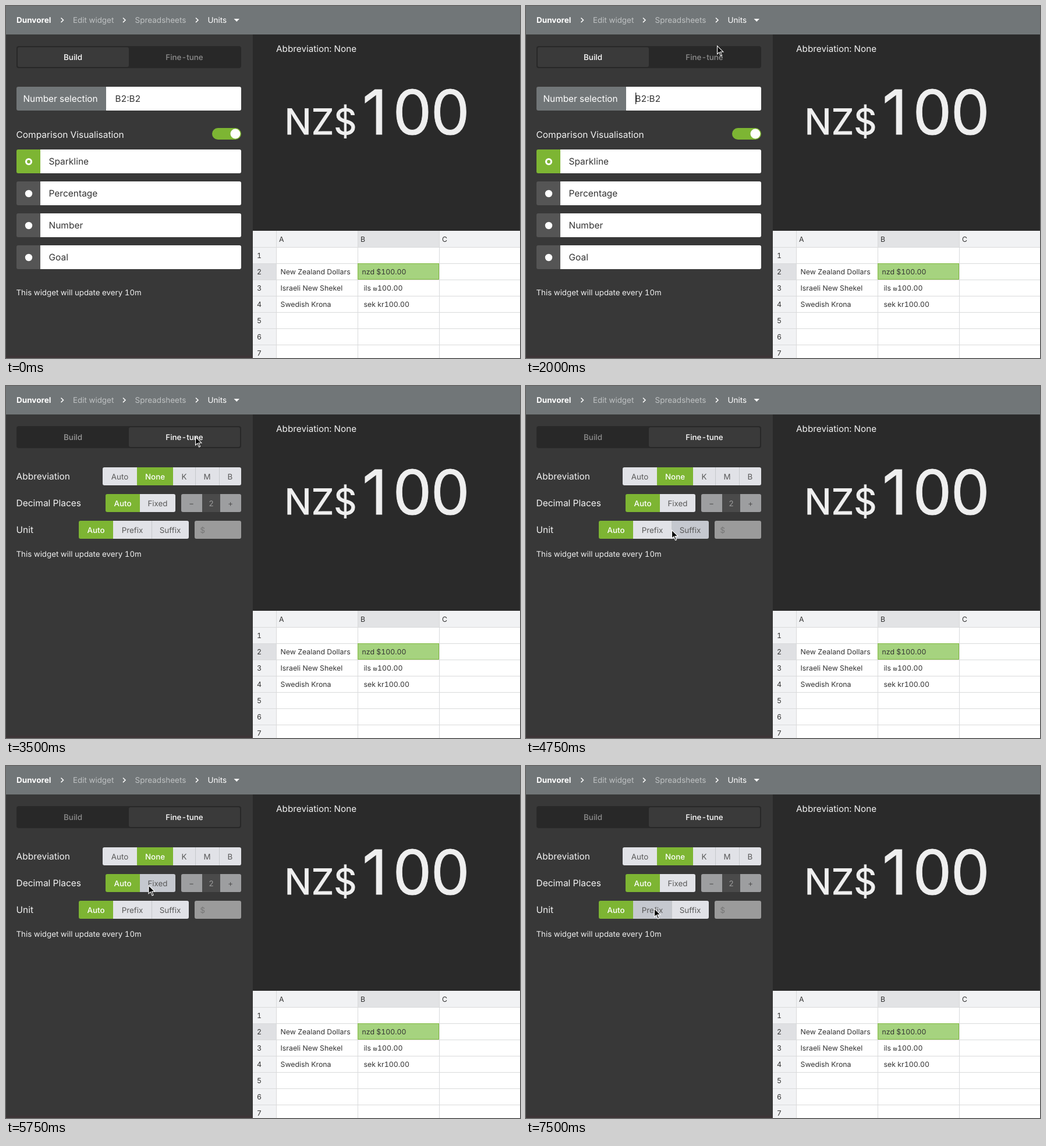
These frames come from a looping animation (883 px wide and 606 px high, 8000 ms). An HTML page:

```html
<!DOCTYPE html>
<html lang="en">
<head>
<meta charset="utf-8">
<title>Widget units</title>
<style>
html, body { margin: 0; width: 100%; height: 100%; overflow: hidden; background: #383838; }
svg { display: block; width: 883px; height: 606px; font-family: Inter, Roboto, "Liberation Sans", sans-serif; font-variant-numeric: tabular-nums; }
text { white-space: pre; }
.amount { font-variant-numeric: normal; stroke: #efefef; stroke-width: 0.9px; }
</style>
</head>
<body>
<svg id="stage" viewBox="0 0 883 606" text-rendering="geometricPrecision"></svg>
<script>
const LOOP = 8000;
const GREEN = '#7db533', GREY = '#717678', LIGHT = '#e1e2e7', HOVER = '#c5c8cf', INK = '#333', DIM = '#8d8d8d';

const rect = (x, y, w, h, fill, extra = '') =>
  `<rect x="${x}" y="${y}" width="${w}" height="${h}" fill="${fill}" ${extra}/>`;
const text = (x, y, str, size, fill, extra = '') =>
  `<text x="${x}" y="${y}" font-size="${size}" fill="${fill}" ${extra}>${str}</text>`;
const path = (d, extra) => `<path d="${d}" ${extra}/>`;
const group = (id, content) => `<g id="${id}">${content}</g>`;
const MID = 'text-anchor="middle"';
const MEDIUM = 'font-weight="500"';

// A rectangle with only its left or right corners rounded
function sided(x, y, w, h, left, right, fill, id = '') {
  const r = 3, a = left ? r : 0, b = right ? r : 0;
  return path(`M${x + a} ${y}H${x + w - b}q${b} 0 ${b} ${b}V${y + h - b}q0 ${b} ${-b} ${b}` +
    `H${x + a}q${-a} 0 ${-a} ${-a}V${y + a}q0 ${-a} ${a} ${-a}z`, `fill="${fill}" ${id && `id="${id}"`}`);
}

function header() {
  const chevron = x => path(`M${x} 20.5l4 3.8l-4 3.8`, 'fill="none" stroke="#fff" stroke-width="1.5"');
  return rect(0, 0, 883, 49, GREY) +
    text(18, 29, 'Dunvorel', 13.5, '#fff', 'font-weight="700"') +
    text(115, 29, 'Edit widget', 13.4, '#bfc2c3') +
    text(221.5, 29, 'Spreadsheets', 13.5, '#bfc2c3') +
    text(346.5, 29, 'Units', 13.5, '#fff') +
    [94.5, 201, 326].map(chevron).join('') +
    path('M391.5 22h9.5l-4.75 5z', 'fill="#fff"');
}

function tabs() {
  return rect(18, 69, 386, 38, '#282828', 'rx="4"') +
    rect(20, 71, 191, 34, '#3a3a3a', 'rx="3" id="activeTab"') +
    text(115, 93, 'Build', 13.5, '#fff', `${MID} ${MEDIUM} id="buildLabel"`) +
    text(306.5, 93, 'Fine-tune', 13.4, DIM, `${MID} ${MEDIUM} id="tuneLabel"`);
}

const updateNote = y => text(17.5, y, 'This widget will update every 10m', 13.3, '#f0f0f0');

function buildPanel() {
  const options = ['Sparkline', 'Percentage', 'Number', 'Goal'].map((name, i) => {
    const y = 247 + i * 55, on = i === 0;
    const dot = on ? 'r="4.5" fill="none" stroke="#fff" stroke-width="3.2"' : 'r="6.2" fill="#fff"';
    return sided(18, y, 41, 41, 1, 0, on ? GREEN : '#555') + sided(59, y, 345, 41, 0, 1, '#fff') +
      `<circle cx="39" cy="${y + 21}" ${dot}/>` + text(73.5, y + 26, name, 15.5, INK);
  }).join('');
  return sided(18, 139, 154, 41, 1, 0, GREY) + sided(172, 139, 232, 41, 0, 1, '#fff') +
    text(29.5, 165, 'Number selection', 15.4, '#fff') +
    text(187.5, 165, 'B2:B2', 15.3, INK) +
    rect(188, 149, 1.3, 20, '#222', 'id="caret"') +
    text(17.5, 227, 'Comparison Visualisation', 15.5, '#f4f4f4') +
    rect(354, 210, 50, 20, GREEN, 'rx="10"') + '<circle cx="394" cy="220" r="8.5" fill="#fff"/>' +
    options + updateNote(498);
}

function segments(y, edges, names, selected, ids = []) {
  const last = names.length - 1;
  return names.map((name, i) => {
    const x = edges[i], w = edges[i + 1] - x, on = i === selected;
    return sided(x, y, w, 31, i === 0, i === last, on ? GREEN : LIGHT, ids[i]) +
      (i > selected + 1 ? rect(x, y, 1, 31, '#c6c8cc') : '') +
      text(x + w / 2, y + 21, name, 13.4, on ? '#fff' : '#585858', `${MID} ${on ? MEDIUM : ''}`);
  }).join('');
}

function tunePanel() {
  const labels = ['Abbreviation', 'Decimal Places', 'Unit']
    .map((name, i) => text(17.5, 161 + i * 46, name, 15.5, '#f4f4f4')).join('');
  return labels +
    segments(140, [166, 225, 287, 325, 366, 404], ['Auto', 'None', 'K', 'M', 'B'], 1) +
    segments(186, [171, 230, 291], ['Auto', 'Fixed'], 0, ['', 'fixedButton']) +
    sided(301, 186, 36, 31, 1, 0, '#9d9ea0') + rect(337, 186, 31, 31, '#4a4a4a') +
    sided(368, 186, 36, 31, 0, 1, '#9d9ea0') +
    text(318.5, 207, '−', 13.4, '#505050', MID) + text(352.5, 207, '2', 13.4, '#9a9a9a', MID) +
    text(385.5, 207, '+', 13.4, '#505050', MID) +
    segments(232, [125, 184, 250, 314], ['Auto', 'Prefix', 'Suffix'], 0, ['', 'prefixButton', 'suffixButton']) +
    rect(324, 232, 80, 31, '#9b9b9b', 'rx="3"') + text(333.5, 253, '$', 13.4, '#777') +
    updateNote(294);
}

function preview() {
  const amount = (x, str, size, extra = '') => text(x, 221, str, size, '#efefef', `class="amount" ${extra}`);
  return rect(424, 49, 459, 338, '#2a2a2a') +
    text(464, 79, 'Abbreviation: None', 15.3, '#f2f2f2') +
    amount(478.5, 'NZ$', 61.3) + amount(612, '1', 106) + amount(664.5, '00', 106, 'letter-spacing="-1.6"');
}

function sheet() {
  const cell = (x, row, str) => text(x, 434 + (row - 1) * 28, str, 12.35, INK);
  let out = rect(424, 387, 459, 219, '#fff') + rect(424, 387, 459, 28, '#f1f2f4') +
    rect(604, 387, 140, 28, '#e2e3e5') + rect(424, 415, 40, 191, '#f1f2f4') + rect(424, 443, 40, 28, '#dfe0e3');
  for (let row = 1; row <= 7; row++) {
    out += rect(424, 387 + row * 28, 459, 1, '#d9dadb') + cell(431, row, row);
  }
  for (const x of [464, 604, 744]) out += rect(x, 387, 1, 219, '#d9dadb');
  ['A', 'B', 'C'].forEach((name, i) => { out += cell(469 + i * 140, 0, name); });
  return out + rect(604.5, 443.5, 139, 27, '#a6d37f', 'stroke="#80b93f"') +
    cell(471.5, 2, 'New Zealand Dollars') + cell(611.5, 2, 'nzd $100.00') +
    cell(471.5, 3, 'Israeli New Shekel') +
    cell(614.5, 3, 'ils <tspan font-size="9.5">₪</tspan>100.00') +
    cell(471.5, 4, 'Swedish Krona') + cell(614.5, 4, 'sek kr100.00');
}

const pointer = group('pointer',
  path('M0 0V16.6L3.7 13.1L6.3 19.2L9.3 17.9L6.8 12H12.2Z', 'fill="#fff"') +
  path('M1.1 2.6V14.1L4.1 11.3L6.8 17.7L7.9 17.2L5.2 10.9H9.6Z', 'fill="#000"'));

const stage = document.getElementById('stage');
stage.innerHTML = rect(0, 0, 424, 606, '#383838') + rect(0, 602, 424, 4, '#3d3537') + header() + tabs() +
  group('buildPanel', buildPanel()) + group('tunePanel', tunePanel()) + preview() + sheet() + pointer;

const el = id => document.getElementById(id);
const show = (id, on) => el(id).setAttribute('visibility', on ? 'visible' : 'hidden');
const fill = (id, color) => el(id).setAttribute('fill', color);

// The pointer jumps: time, x, y
const stops = [
  [1000, 534, 40], [1250, 406, 65], [1500, 325, 74], [1750, 328, 68], [2000, 328, 67.5],
  [2250, 326, 80], [2500, 325, 86.5], [4000, 327, 119], [4250, 305, 225], [4500, 303, 230],
  [4750, 250, 247], [5000, 226, 243], [5250, 220, 216], [5500, 243, 205], [5750, 244.5, 204.5],
  [7000, 240, 211.5], [7250, 224, 230], [7500, 220, 244.5]
];

function render(t) {
  const within = (from, to) => t >= from && t < to;
  const tuning = t >= 3500;
  const stop = stops.filter(s => s[0] <= t).pop();

  show('pointer', !!stop);
  if (stop) el('pointer').setAttribute('transform', `translate(${stop[1]} ${stop[2]})`);
  show('buildPanel', !tuning);
  show('tunePanel', tuning);
  show('caret', within(2000, 3000));

  el('activeTab').setAttribute('x', tuning ? 211 : 20);
  fill('buildLabel', !tuning ? '#fff' : t < 3750 ? '#9a9a9a' : DIM);
  fill('tuneLabel', t < 2250 ? DIM : t < 2500 ? '#c8c8c8' : '#fff');

  fill('suffixButton', within(4750, 5000) ? HOVER : LIGHT);
  fill('prefixButton', within(5000, 5250) || t >= 7500 ? HOVER : LIGHT);
  fill('fixedButton', within(5500, 7250) ? HOVER : LIGHT);
}

const start = performance.now();
function tick() {
  render((performance.now() - start) % LOOP);
  requestAnimationFrame(tick);
}
tick();
</script>
</body>
</html>
```
